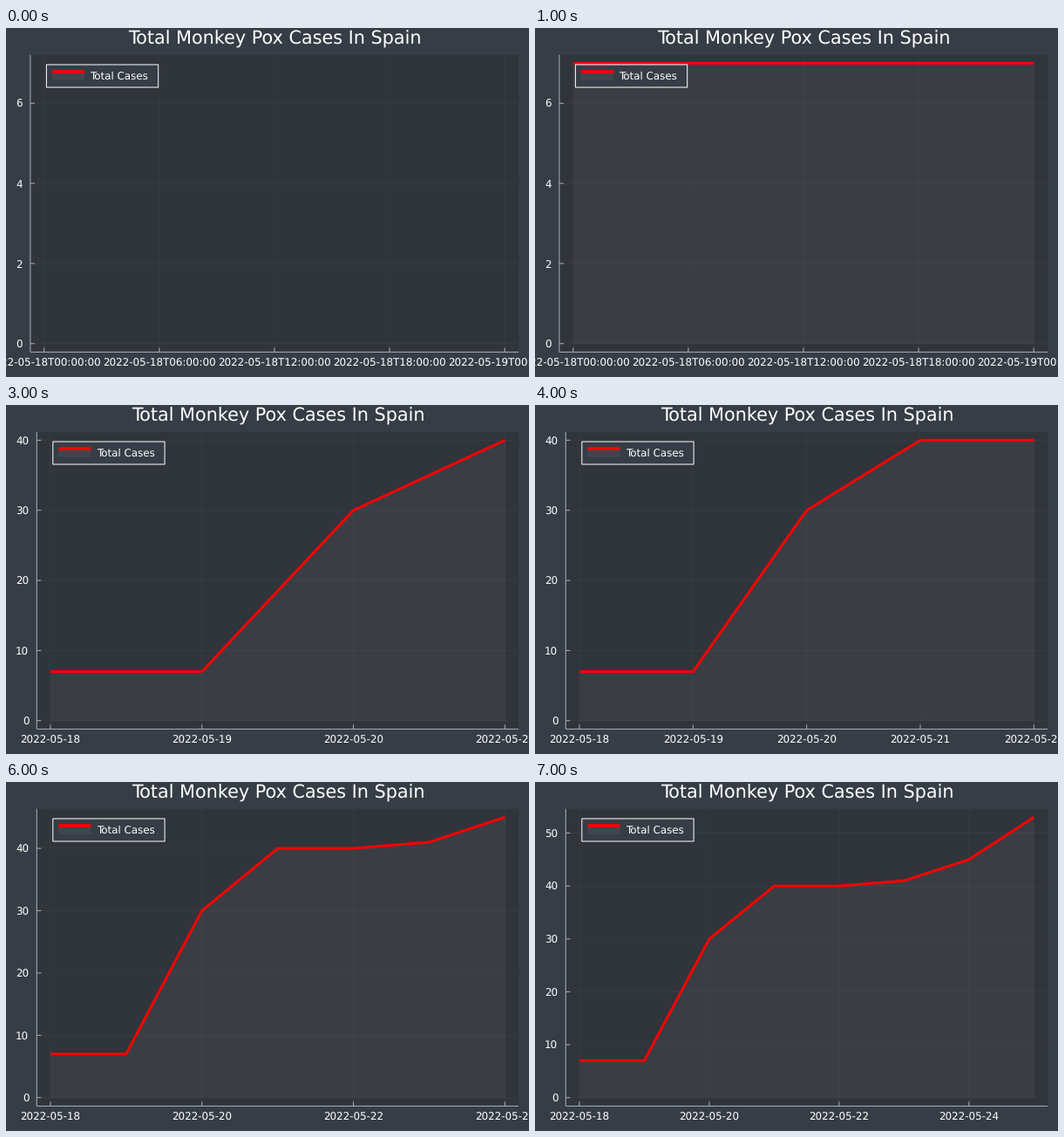
These frames come from a looping animation (600 by 400 pixels, 8 s). A matplotlib script:

```python
import matplotlib.pyplot as plt
from matplotlib.animation import FuncAnimation
from matplotlib.patches import Rectangle

plt.rcParams["font.family"] = "DejaVu Sans"
plt.rcParams["text.hinting"] = "no_hinting"
plt.rcParams["path.snap"] = False

W, H, DPI = 600, 400, 100
PT = 72 / DPI  # points per pixel
CASES = [7, 7, 30, 40, 40, 41, 45, 53]

PAGE, PANEL = "#363D46", "#30343B"
AXIS, TEXT, LINE = "#ADB2B7", "#FFFFFF", "#FF0000"
FILL = (0.62, 0.58, 0.60, 0.1)
GRID = (0.68, 0.70, 0.72, 0.06)

TOP, RIGHT, BOTTOM = 30.7, 588, 371.4
PAD = 0.03 / 1.06  # margin on each side of the data
SMALL, LARGE = 11.9, 20.8

fig = plt.figure(figsize=(W / DPI, H / DPI), dpi=DPI, facecolor=PAGE)
ax = fig.add_axes([0, 0, 1, 1])


def stroke(xs, ys, color, width=1, z=3):
    ax.plot(xs, ys, color=color, lw=width * PT, zorder=z, snap=False,
            solid_capstyle="butt", solid_joinstyle="round")


def label(x, y, text, size=SMALL, ha="center"):
    ax.text(x, y, text, fontsize=size * PT, color=TEXT, ha=ha,
            va="baseline", zorder=6)


def box(x, y, w, h, face, edge="none", z=1):
    ax.add_patch(Rectangle((x, y), w, h, facecolor=face, edgecolor=edge,
                           lw=PT if edge != "none" else 0, zorder=z,
                           snap=False))


def x_ticks(days):
    """Pairs of position in days and label."""
    if days == 1:
        stamps = [(18, 0), (18, 6), (18, 12), (18, 18), (19, 0)]
        return [(d - 18 + h / 24, f"2022-05-{d}T{h:02d}:00:00")
                for d, h in stamps]
    step = 1 if days < 6 else 2
    return [(d, f"2022-05-{18 + d}") for d in range(0, days + 1, step)]


def legend(left):
    x = left + 18.5
    box(x, 42, 128.3, 26, PAGE, TEXT, z=4)
    box(x + 6.4, 50, 37.2, 9.8, FILL, z=5)
    stroke([x + 6.4, x + 43.6], [50, 50], LINE, 3.6, z=6)
    label(x + 49.8, 59, "Total Cases", ha="left")


def draw(i):
    ax.clear()
    ax.set_xlim(0, W)
    ax.set_ylim(H, 0)
    ax.axis("off")

    days = max(i, 1)
    data = CASES[:i + 1]
    peak = max(data)
    left = 27.9 if days == 1 else 35.3
    wide, tall = RIGHT - left, BOTTOM - TOP

    def px(d):
        return left + wide * (PAD + d / days / 1.06)

    def py(v):
        return BOTTOM - tall * (PAD + v / peak / 1.06)

    box(left, TOP, wide, tall, PANEL, z=0)

    for d, name in x_ticks(days):
        x = px(d)
        stroke([x, x], [TOP, BOTTOM], GRID, z=1)
        stroke([x, x], [BOTTOM, BOTTOM - 5], AXIS)
        label(x, 388, name)

    for v in range(0, peak + 1, 2 if peak < 10 else 10):
        y = py(v)
        stroke([left, RIGHT], [y, y], GRID, z=1)
        stroke([left, left + 5], [y, y], AXIS)
        label(left - 9, y + 5, str(v), ha="right")

    stroke([left, left], [TOP, BOTTOM], AXIS)
    stroke([left, RIGHT], [BOTTOM, BOTTOM], AXIS)

    if i > 0:
        xs = [px(d) for d in range(len(data))]
        ys = [py(v) for v in data]
        ax.fill_between(xs, ys, py(0), color=FILL, lw=0, zorder=2, snap=False)
        stroke(xs, ys, LINE, 3, z=4)

    legend(left)
    label((left + RIGHT) / 2 + 0.5, 18.3,
          "Total Monkey Pox Cases In Spain", LARGE)
    return []


anim = FuncAnimation(fig, draw, frames=len(CASES), init_func=lambda: draw(0),
                     interval=1000, repeat=True, repeat_delay=0)
plt.show()
```
